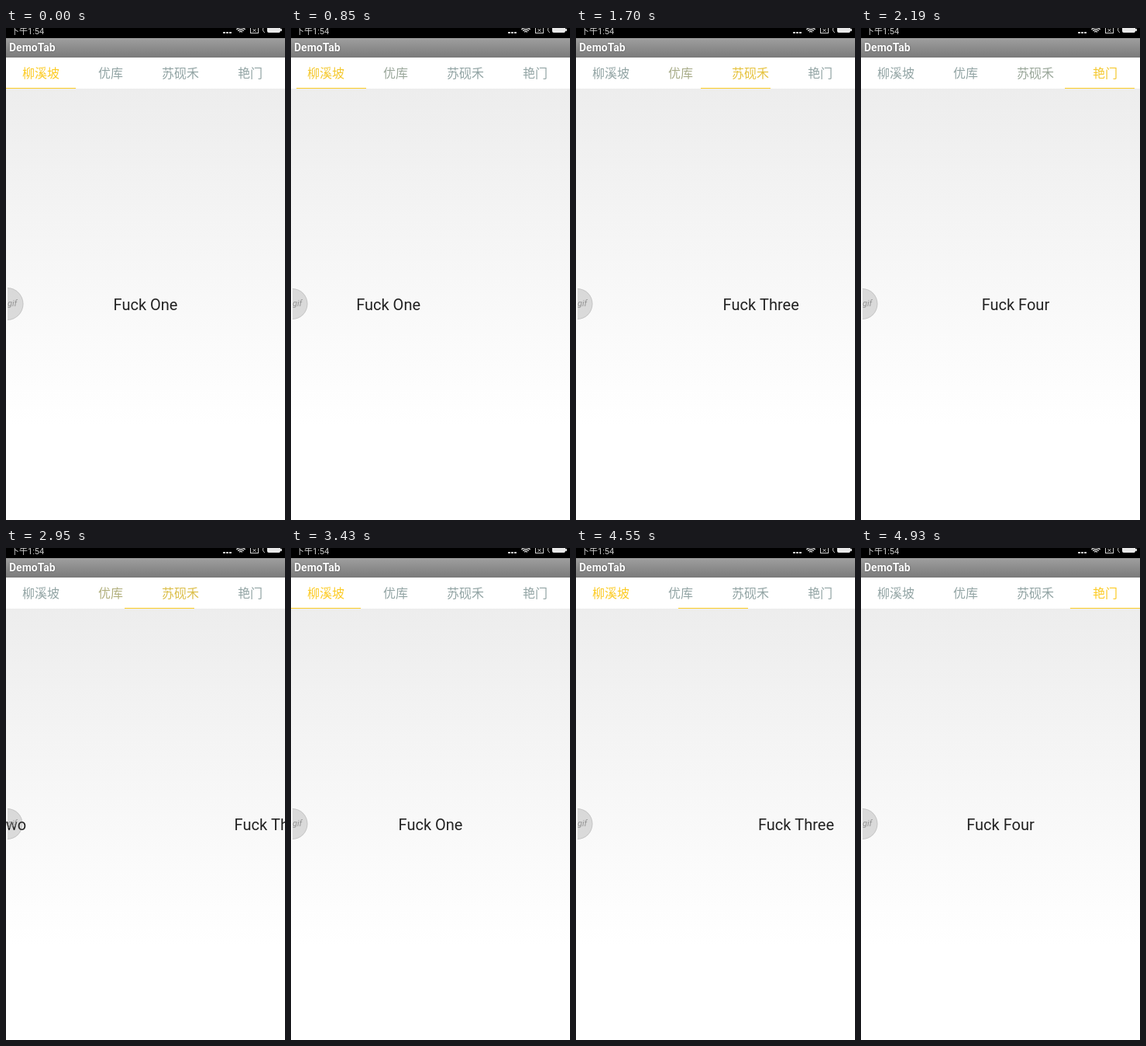
An HTML page with a canvas that plays this animation: 360 px wide and 633 px high, repeating every 5650 ms.

```html
<!DOCTYPE html>
<html lang="zh-CN">
<head>
<meta charset="utf-8">
<title>DemoTab</title>
<style>
html, body { margin: 0; width: 100%; height: 100%; overflow: hidden; background: #fff; }
canvas { display: block; width: 360px; height: 633px; }
</style>
</head>
<body>
<canvas id="stage"></canvas>
<script>
const W = 360, H = 633, LOOP = 5650;
const TICK = 93;
const LINE_LAG = 80;  // the underline trails the pages, less so as they settle
const TAB_W = W / 4;
const CJK = '"Noto Sans CJK SC", "Noto Sans CJK", sans-serif';
const LATIN = 'Roboto, sans-serif';
const GREY = [146, 164, 164], YELLOW = [252, 203, 36];
const tabs = ['柳溪坡', '优库', '苏砚禾', '艳门'];
const pages = ['Fuck One', 'Fuck Two', 'Fuck Three', 'Fuck Four'];

const gestures = [
  { start: 750, duration: 758, to: 1 },
  { start: 1420, duration: 500, to: 2 },
  { start: 1890, duration: 433, to: 3 },
  { start: 2620, duration: 300, to: 2 },
  { start: 2855, duration: 396, to: 1 },
  { start: 3150, duration: 373, to: 0 },
  { start: 4250, duration: 680, to: 3, tap: true }
];

const canvas = document.getElementById('stage');
const ctx = canvas.getContext('2d');
const ratio = window.devicePixelRatio || 1;
canvas.width = W * ratio;
canvas.height = H * ratio;
ctx.scale(ratio, ratio);

const clamp = u => Math.min(1, Math.max(0, u));
const ease = u => u * u * (3 - 2 * u);
const lerp = (a, b, k) => a + (b - a) * k;
const rgb = c => `rgb(${c.map(Math.round).join(',')})`;

// Positions of pages, underline and tab highlight, in pages
function pose(t) {
  const i = gestures.findLastIndex(g => t >= g.start);
  if (i < 0) return { page: 0, line: 0, active: 0 };
  const { start, duration, to, tap } = gestures[i];
  const from = i ? gestures[i - 1].to : 0;
  const u = clamp((Math.floor((t - start) / TICK) + 1) * TICK / duration);
  const lagged = clamp(u - (1 - u) * LINE_LAG / duration);
  const line = lerp(from, to, ease(lagged));
  const active = tap ? (u > .95 ? to : from) : line;
  return { page: lerp(from, to, ease(u)), line, active };
}

function text(str, x, y, font, color, align = 'left') {
  ctx.font = font;
  ctx.fillStyle = color;
  ctx.textAlign = align;
  ctx.fillText(str, x, y);
}

function rect(x, y, w, h, fill) {
  ctx.fillStyle = fill;
  ctx.fillRect(x, y, w, h);
}

function fade(y0, y1, from, to) {
  const g = ctx.createLinearGradient(0, y0, 0, y1);
  g.addColorStop(0, from);
  g.addColorStop(1, to);
  return g;
}

function strokeArc(x, y, r, a, b) {
  ctx.beginPath();
  ctx.arc(x, y, r, a, b);
  ctx.stroke();
}

function drawStatusBar() {
  const ink = '#cfcfcf';
  rect(0, 0, W, 13, '#000');
  text('下午1:54', 6, 7.5, `11px Roboto, ${CJK}`, ink);
  for (let i = 0; i < 3; i++) rect(280 + i * 4, 5, 3, 2, ink);
  ctx.strokeStyle = ink;
  ctx.lineWidth = 1.4;
  for (let r = 2.5; r < 8; r += 2.5) strokeArc(303, 7, r, -Math.PI * .77, -Math.PI * .23);
  ctx.lineWidth = 1;
  ctx.strokeRect(315.5, -1.5, 10, 8);
  ctx.beginPath();
  for (const side of [-2, 2]) {
    ctx.moveTo(320.5 - side, 1);
    ctx.lineTo(320.5 + side, 5);
  }
  ctx.stroke();
  strokeArc(336, 2, 4.5, Math.PI * .65, Math.PI * 1.35);
  ctx.beginPath();
  ctx.roundRect(337, -2, 17, 8, 2);
  ctx.fillStyle = '#e8e8e8';
  ctx.fill();
  rect(354, 1, 2, 3, ink);
}

function drawTitle() {
  rect(0, 13, W, 25, fade(13, 38, '#9f9f9f', '#7a7a7a'));
  ctx.shadowColor = 'rgba(0,0,0,.45)';
  ctx.shadowBlur = 2;
  text('DemoTab', 4, 30, `bold 14px ${LATIN}`, '#fff');
  ctx.shadowBlur = 0;
}

function drawTabs(line, active) {
  rect(0, 38, W, 40, '#fff');
  tabs.forEach((name, i) => {
    const weight = clamp(1 - Math.abs(i - active));
    const color = rgb(GREY.map((v, c) => lerp(v, YELLOW[c], weight)));
    text(name, TAB_W * (i + .5), 64, `16px ${CJK}`, color, 'center');
  });
  rect(Math.round(TAB_W * line), 77, TAB_W, 1, rgb(YELLOW));
}

function drawPages(page) {
  rect(0, 78, W, H - 78, fade(78, 510, '#ededed', '#fff'));
  pages.forEach((label, i) => {
    text(label, W * (i - page + .5), 363, `20px ${LATIN}`, '#222', 'center');
  });
}

function drawBubble(r) {
  ctx.save();
  ctx.beginPath();
  ctx.rect(2, 330, 30, 50);
  ctx.clip();
  ctx.beginPath();
  ctx.arc(1.5, 355, r, 0, Math.PI * 2);
  ctx.fillStyle = 'rgba(60,60,60,.16)';
  ctx.fill();
  ctx.lineWidth = 1;
  ctx.strokeStyle = 'rgba(120,120,120,.2)';
  strokeArc(1.5, 355, r - .5, 0, Math.PI * 2);
  text('gif', 2, 358, `italic 11px ${LATIN}`, '#949494');
  ctx.restore();
}

function draw(t) {
  const { page, line, active } = pose(t);
  drawPages(page);
  drawTabs(line, active);
  drawTitle();
  drawStatusBar();
  drawBubble(t < 120 ? 21 : 20);
}

const begin = performance.now();
function tick() {
  draw((performance.now() - begin) % LOOP);
  requestAnimationFrame(tick);
}
tick();
</script>
</body>
</html>
```
